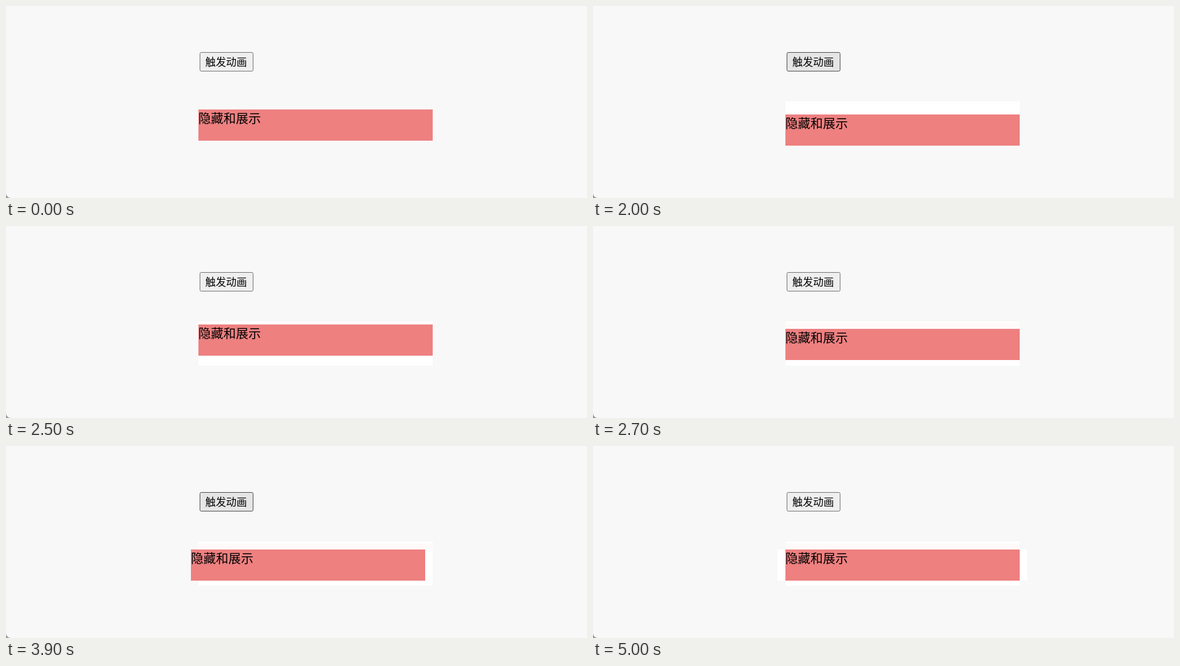
An HTML page that plays this animation: 930x308 px, repeating every 6.1 s.

```html
<!DOCTYPE html>
<html lang="zh-CN">
<head>
<meta charset="utf-8">
<style>
  html, body { margin: 0; width: 100%; height: 100%; overflow: hidden; background: #999; }
  svg { display: block; width: 930px; height: 308px; background: #f8f8f8; border-bottom-left-radius: 8px; }
  text { font-family: "Noto Sans CJK SC", "Noto Sans CJK", sans-serif; fill: #000; }
</style>
</head>
<body>
<svg viewBox="0 0 930 308">
  <rect id="button" x="310.5" y="74.5" width="85" height="30" rx="2"/>
  <text x="319" y="96" font-size="16.67">触发动画</text>
  <rect id="trailY" x="308" width="375" fill="#fff"/>
  <rect id="tint" x="308" y="156" width="375" height="9" fill="#fffafa"/>
  <rect id="trailX" y="166" height="50" fill="#fff"/>
  <g id="panel">
    <rect x="308" y="166" width="375" height="50" fill="#ee8080"/>
    <text x="308" y="188" font-size="20">隐藏和展示</text>
  </g>
</svg>
<script>
const LOOP = 6100, STEP = 100;
const leave = { start: 1900, offsets: [-13, 8, -8, 7, -8, 8, -8, 8, -1] };
const enter = { start: 3900, offsets: [-12, 11, -12, 11, -12, 12, -12, 12, -13] };
const styles = {
  normal: ['#efefef', '#767676'],
  hover: ['#e5e5e5', '#4f4f4f'],
  active: ['#f5f5f5', '#8d8d8d']
};
const buttonStates = [[0, 'normal'], [1400, 'hover'], [2100, 'normal'], [3500, 'hover'],
  [3800, 'active'], [3900, 'hover'], [5000, 'normal']];

const el = id => document.getElementById(id);
const set = (id, attrs) => {
  for (const name in attrs) el(id).setAttribute(name, attrs[name]);
};

// Current displacement and the range swept so far
function shake({ start, offsets }, t) {
  const count = Math.max(0, Math.floor((t - start) / STEP) + 1);
  const seen = [0, ...offsets.slice(0, count)];
  return { now: offsets[count - 1] || 0, min: Math.min(...seen), max: Math.max(...seen) };
}

function draw(t) {
  const [fill, stroke] = styles[buttonStates.filter(s => s[0] <= t).pop()[1]];
  set('button', { fill, stroke });

  const x = shake(enter, t), y = shake(leave, t);
  set('trailY', { y: 166 + y.min, height: y.max - y.min && 50 + y.max - y.min });
  set('trailX', { x: 308 + x.min, width: x.max - x.min && 375 + x.max - x.min });
  set('tint', { visibility: t >= 2300 ? 'visible' : 'hidden' });
  set('panel', {
    transform: `translate(${x.now} ${y.now})`,
    visibility: t >= 2800 && t < enter.start ? 'hidden' : 'visible'
  });
}

function tick() {
  draw(performance.now() % LOOP);
  requestAnimationFrame(tick);
}
tick();
</script>
</body>
</html>
```
